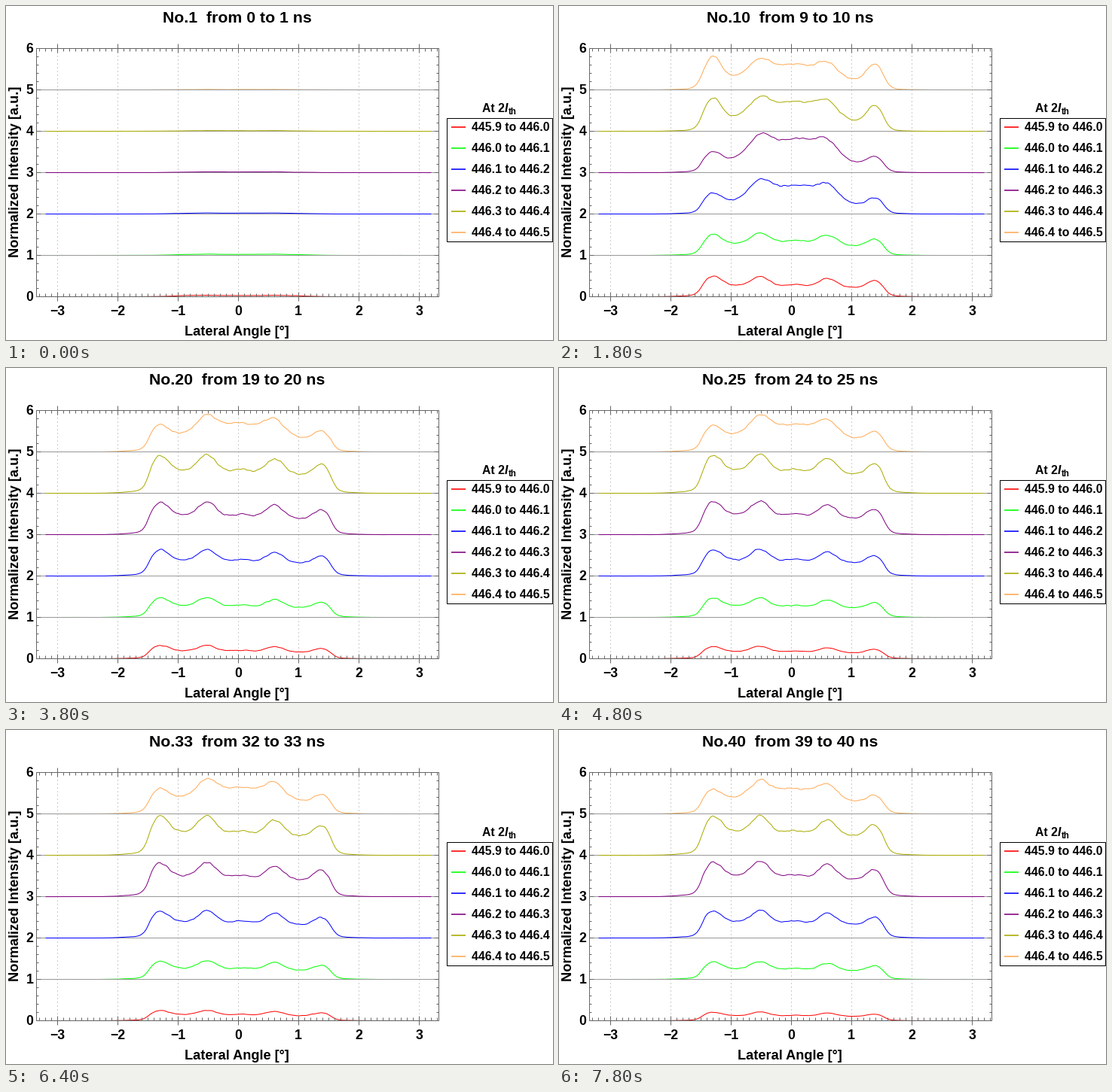
Write a matplotlib script that moves like this. It is 726 px wide and 444 px high and loops after 8 s.

```python
import numpy as np
import matplotlib.pyplot as plt
from matplotlib.animation import FuncAnimation
from matplotlib.patches import Rectangle

W, H, DPI = 726, 444, 96
FRAMES, STEP = 40, 200
X0, Y0, SX, SY = 308, 386, 80, 55
LEFT, RIGHT, TOP = 40, 574, 56
PX = 72 / DPI
GRAY, RULE = "#666666", "#999999"
COLORS = ["#ff0000", "#00ff00", "#0000ff", "#800080", "#aaaa00", "#ffaa55"]

XS = np.linspace(-3.2, 3.2, 193)
BANDS = np.arange(6)


def bump(center, width):
    return np.exp(-((XS - center) / width) ** 2 / 2)


# Building blocks of every beam profile
EDGE = 1 / (1 + np.exp((np.abs(XS - .03) - 1.52) / .045))
SKIRT = np.exp(-(XS / 1.9) ** 8)
PLATEAU = (.88 * EDGE + .12 * SKIRT) * (1 - .1 * XS)
OUTER = bump(-1.3, .14) + .8 * bump(1.38, .13)
INNER = bump(-.52, .145) + .9 * bump(.6, .145) + .2 * bump(.07, .14)
SHOULDER = bump(-.9, .12) + .9 * bump(.95, .12)


def mix(plateau, core, outer, inner, shoulder):
    """Strength of each building block, one row per band."""
    return np.column_stack([v + 0 * BANDS for v in (plateau, core, outer, inner, shoulder)])


# Young pulse: a broad core, weaker for longer wavelengths
power = .7 - .1 * BANDS
EARLY = mix(0, power, 0, .32 * power, power * np.maximum(0, .3 - .1 * BANDS))

# Transition: the core narrows and the outer lobes appear
core = np.interp(BANDS, [0, .8, 2.5, 5], [0, 0, .58, .33])
MIDDLE = mix(.25, core, np.where(BANDS < 4, .23, .53), .23, 0)

# Steady state: four lobes on a plateau
level = np.interp(BANDS, [0, 4, 5], [.19, .5, .37])
SETTLED = mix(level, np.where(BANDS < 5, 0, .29), .7 * level, .8 * level, 0)
LATE = SETTLED * (1.1 - .5 * ((BANDS - 3) / 3) ** 2)[:, None]


def blend(a, b, t):
    return a + (b - a) * t


def strengths(ns):
    if ns <= 5:
        return EARLY * (.04 + .96 * ((ns - 1) / 4) ** 2)
    if ns <= 10:
        return blend(EARLY, MIDDLE, (ns - 5) / 5)
    if ns <= 16:
        return blend(MIDDLE, SETTLED, (ns - 10) / 6)
    return blend(SETTLED, LATE, (ns - 16) / 24)


def profiles(ns):
    width = np.interp(ns, [5, 10], [1.2, .82])
    parts = np.array([PLATEAU, np.exp(-(XS / width) ** 4), OUTER, INNER, SHOULDER])
    y = strengths(ns) @ parts
    noise = np.random.default_rng(ns).normal(size=y.shape)
    noise = (noise + np.roll(noise, 1, axis=1)) / 2
    return y * (1 + .02 * noise) + .001 * noise


fig = plt.figure(figsize=(W / DPI, H / DPI), dpi=DPI, facecolor="white")
ax = fig.add_axes([0, 0, 1, 1])
ax.set_xlim(0, W)
ax.set_ylim(H, 0)
ax.axis("off")


def text(x, y, s, size, ha="center", **kw):
    return ax.text(x, y, s, fontsize=size * PX, ha=ha, va="baseline",
                   family="Liberation Sans", weight="bold", color="black", **kw)


def line(x1, y1, x2, y2, color=GRAY, width=1, **kw):
    return ax.plot([x1, x2], [y1, y2], color=color, lw=width * PX,
                   solid_capstyle="butt", **kw)[0]


def box(x, y, w, h, color, **kw):
    return ax.add_patch(Rectangle((x, y), w, h, fill=False, ec=color, lw=PX, **kw))


# Grid, ticks and frame; whole coordinates snap to pixel centres
for n in range(-3, 4):
    x = X0 + n * SX
    line(x, TOP, x, Y0, RULE, zorder=1, ls=(0, (1, 4)), dash_capstyle="butt")
    text(x, 411, str(n).replace("-", "\u2212"), 17.6)
for k in range(-33, 34):
    x = X0 + k * SX / 10
    inner, outer = (6, 6) if k % 10 == 0 else (4, 0)
    line(x, Y0 + outer, x, Y0 - inner, zorder=5)
    line(x, TOP - outer, x, TOP + inner, zorder=5)
for k in range(31):
    y = Y0 - k * SY / 5
    size = 6 if k % 5 == 0 else 3
    line(LEFT, y, LEFT + size, y, zorder=5)
    line(RIGHT, y, RIGHT - size, y, zorder=5)
for n in range(7):
    text(36.5, Y0 - n * SY + 6, str(n), 17.6, "right")
for n in range(1, 6):
    line(LEFT, Y0 - n * SY, RIGHT, Y0 - n * SY, RULE, zorder=4 if n in (1, 5) else 2)
frame = box(LEFT, TOP, RIGHT - LEFT, Y0 - TOP, GRAY, zorder=5)

# Labels
title = text(306.5, 22, "", 21.3)
text(306.7, 438, "Lateral Angle [\u00b0]", 18.1)
text(17.5, 220.5, "Normalized Intensity [a.u.]", 18.2, rotation=90,
     rotation_mode="anchor")

# Legend
text(631.5, 141, "At 2", 15.8, "left")
text(661.5, 141, "I", 15.8, "left", style="italic")
text(666.5, 144, "th", 11.5, "left")
box(585, 149, 140, 164, "black")
for i, c in enumerate(COLORS):
    y = 161 + 28 * i
    line(591, y, 610, y, c, 1.6)
    low = 445.9 + i / 10
    text(617.5, y + 5, f"{low:.1f} to {low + .1:.1f}", 15.8, "left")

curves = [line(0, 0, 0, 0, c, zorder=3) for c in COLORS]
for c in curves:
    c.set_clip_path(frame)


def update(k):
    ns = k + 1
    title.set_text(f"No.{ns}  from {k} to {ns} ns")
    for band, (c, y) in enumerate(zip(curves, profiles(ns))):
        c.set_data(X0 + .5 + SX * XS, Y0 + .5 - SY * (band + y))
    return [title, *curves]


anim = FuncAnimation(fig, update, frames=FRAMES, interval=STEP,
                     init_func=lambda: update(0), repeat=True, repeat_delay=0)
plt.show()
```
